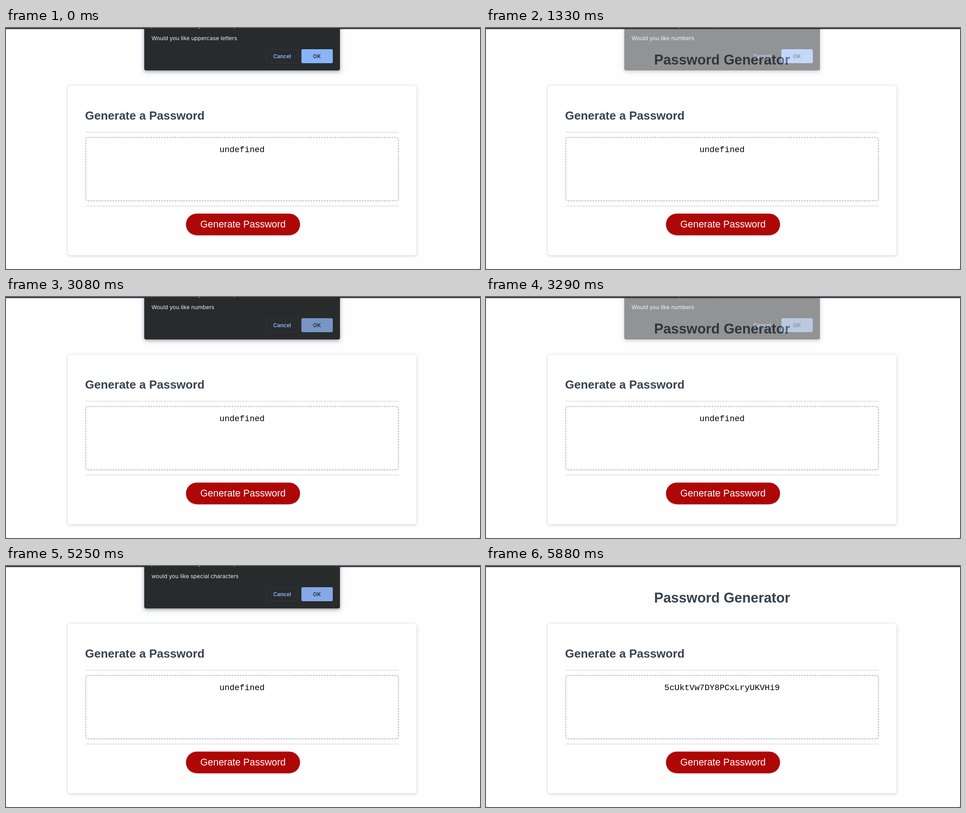
Animation of 1049x534 px, one loop 6.58 s. Source, as an HTML page:

```html
<!DOCTYPE html>
<html lang="en">
<head>
<meta charset="utf-8">
<title>Password dialog</title>
<style>
  html, body { margin: 0; width: 100%; height: 100%; overflow: hidden; background: #fefefe; }
  svg { display: block; width: 100vw; height: 100vh; }
  .head { font-family: "Liberation Sans", Arial, sans-serif; font-weight: 700; fill: #37434e; }
  .press { font: 21.4px "Liberation Sans", Arial, sans-serif; fill: #fff; }
  .field { font: 18.5px "Liberation Mono", "Courier New", monospace; fill: #000; }
  .ui { font-family: Inter, Roboto, sans-serif; font-size: 12.3px; }
  .bold { font-weight: 600; font-size: 11.8px; }
  .card { filter: drop-shadow(0 1px 3px rgba(50, 60, 100, .2)) drop-shadow(0 1px 3px rgba(50, 60, 100, .07)); }
  .cta { filter: drop-shadow(0 1px 1px rgba(0, 0, 0, .2)); }
  .panel { filter: drop-shadow(0 2px 3px rgba(20, 25, 50, .3)) drop-shadow(0 3px 6px rgba(40, 50, 90, .2)); }
</style>
</head>
<body>
<svg viewBox="0 0 1049 534" preserveAspectRatio="none">
  <rect width="1049" height="534" fill="#fefefe"/>
  <rect width="1049" height="2.4" fill="#343139"/>
  <path d="M0 532.5V534H1.5ZM1049 532.5V534H1047.5Z" fill="#555"/>

  <text class="head" x="522.5" y="81" font-size="30.8" text-anchor="middle">Password Generator</text>

  <rect class="card" x="137" y="128" width="771.5" height="375.5" rx="4.5" fill="#fff"/>
  <text class="head" x="175" y="203" font-size="26">Generate a Password</text>
  <path d="M175.500 231H869.500M175.500 394.500H869.500" stroke="#e5e5e6" stroke-width="2"/>
  <rect x="176.500" y="242.500" width="692" height="140.500" rx="5" fill="none"
        stroke="#bdbdbd" stroke-width="1.9" stroke-dasharray="3.9 2.1"/>
  <text class="field" id="field" x="522.5" y="275" text-anchor="middle"></text>
  <rect class="cta" x="398.300" y="411.200" width="252.400" height="48" rx="24" fill="#af0606"/>
  <text class="press" x="524.5" y="442.300" text-anchor="middle">Generate Password</text>

  <g id="dialog">
    <path class="panel" d="M306 -60H739V90a4 4 0 0 1 -4 4H310a4 4 0 0 1 -4 -4Z" fill="#282b2c"/>
    <text class="ui" x="322 424 504" y="-2" font-size="14" fill="#e8eaed">jgy</text>
    <text class="ui" id="ask" x="322" y="27" fill="#e8eaed"></text>
    <rect x="577" y="47.500" width="69" height="30" rx="3" fill="none" stroke="#35393b"/>
    <text class="ui bold" x="611" y="66.500" text-anchor="middle" fill="#8ab4f8">Cancel</text>
    <rect id="ok" x="653.700" y="47" width="69.500" height="31" rx="3"/>
    <text class="ui bold" x="688" y="66.500" text-anchor="middle" fill="#242b38">OK</text>
  </g>
</svg>
<script>
  const LOOP = 6580, STEP = 70;
  const el = id => document.getElementById(id);
  const field = el("field"), dialog = el("dialog"), ask = el("ask"), ok = el("ok");

  const questions = [
    [0, "Would you like uppercase letters"],
    [1330, "Would you like numbers"],
    [3360, "would you like special characters"]
  ];
  const fade = [
    [0, 1], [1190, 1], [1260, .5], [1330, .5], [1400, 1],
    [3220, 1], [3290, .5], [3360, .5], [3430, 1],
    [5670, 1], [5740, .6], [5810, .2], [5880, 0]
  ];
  const dim = [
    [0, 0], [980, 0], [1190, .85], [1260, 1], [1330, 0],
    [1960, 0], [2240, .35], [2590, .4], [2940, 1], [3290, 1], [3360, 0],
    [4900, 0], [5250, .35], [5600, 1]
  ];
  const bright = [138, 180, 248], pressed = [120, 149, 195];

  const mix = (a, b, k) => a + (b - a) * k;

  function track(keys, t) {
    const i = keys.findIndex(k => k[0] > t);
    if (i < 0) return keys[keys.length - 1][1];
    const [t0, a] = keys[i - 1], [t1, b] = keys[i];
    return mix(a, b, (t - t0) / (t1 - t0));
  }

  function draw(now) {
    const t = Math.floor(now % LOOP / STEP) * STEP;
    const k = track(dim, t);
    ask.textContent = questions.filter(q => q[0] <= t).pop()[1];
    field.textContent = t < 5810 ? "undefined" : "5cUktVw7DY8PCxLryUKVHi9";
    dialog.setAttribute("opacity", track(fade, t));
    ok.setAttribute("fill", `rgb(${bright.map((c, i) => Math.round(mix(c, pressed[i], k)))})`);
  }

  const start = performance.now();
  function tick() {
    draw(performance.now() - start);
    requestAnimationFrame(tick);
  }
  tick();
</script>
</body>
</html>
```
